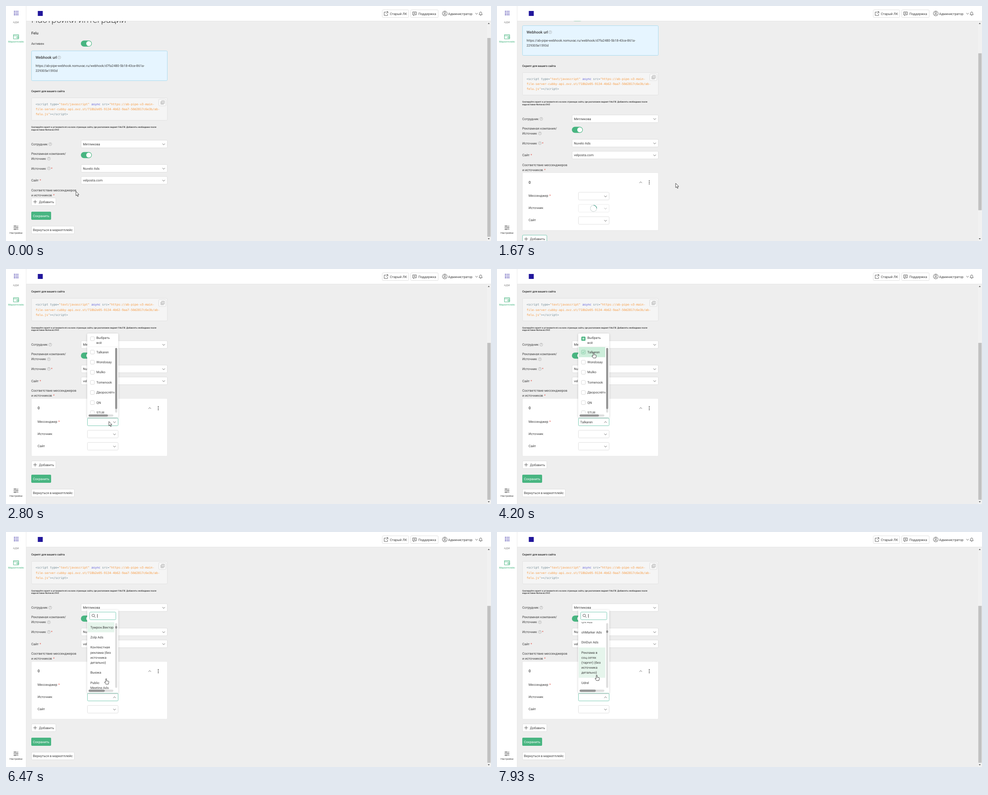
These frames come from a looping animation (1075x521 px, 8 s). An HTML page:

```html
<!DOCTYPE html>
<html lang="ru">
<head>
<meta charset="utf-8">
<title>Настройки интеграции</title>
<style>
html, body { margin: 0; width: 100%; height: 100%; overflow: hidden; background: #eee; }
svg { display: block; width: 1075px; height: 521px; font-family: Roboto, sans-serif; text-rendering: geometricPrecision; }
text { white-space: pre; }
.code { font-family: "DejaVu Sans Mono", monospace; }
.popup { filter: drop-shadow(0 1px 2px #0003); }
</style>
</head>
<body>
<svg id="stage" viewBox="0 0 1075 521"></svg>
<script>
const LOOP = 8000, GROW = 138.5, ROW = 22.4, LINE = 11.2;
const INK = '#3e3e3e', GREEN = '#48b581', TEAL = '#5cbfa2', EDGE = '#d9d9d9', NAVY = '#21169c';

// Drawing helpers; text y is the middle of the capitals
const rect = (x, y, w, h, fill, stroke = 'none', r = 2, more = '') =>
  `<rect x="${x}" y="${y}" width="${w}" height="${h}" rx="${r}" fill="${fill}" stroke="${stroke}" stroke-width=".8" ${more}/>`;
const text = (x, y, s, size = 7.28, fill = INK, more = '') =>
  `<text x="${x}" y="${y + size * .355}" font-size="${size}" fill="${fill}" ${more}>${s}</text>`;
const path = (d, stroke = INK, w = .8, more = '') =>
  `<path d="${d}" fill="none" stroke="${stroke}" stroke-width="${w}" ${more}/>`;
const circle = (x, y, r, fill, stroke = 'none', w = .8) =>
  `<circle cx="${x}" cy="${y}" r="${r}" fill="${fill}" stroke="${stroke}" stroke-width="${w}"/>`;
const group = (id, body, more = '') => `<g id="${id}" ${more}>${body}</g>`;
const bold = 'font-weight="500"', mid = 'text-anchor="middle"';

const chevron = (x, y, id = '', flip = 1) =>
  path('M-2.8-1.4 0 1.4 2.8-1.4', '#555', .9, `id="${id}" transform="translate(${x} ${y}) scale(1 ${flip})"`);
const help = (x, y) => circle(x, y, 3.3, 'none', '#999', .6) + text(x, y, '?', 5, '#888', mid);
const star = (x, y) => text(x, y, '*', 7.28, '#e0483e');
const toggle = y => rect(166, y - 6.8, 24.2, 13.6, GREEN, 'none', 6.8) + circle(183.5, y, 5.6, '#fff');
const select = (y, s) => rect(166.5, y - 8.5, 191, 17, '#fff', EDGE) + text(170.5, y, s) + chevron(349.5, y + .5);
const field = (y, n, s) => text(70, y - 1, s) +
  rect(180.5, y - 8.5, 68, 17, '#fff', EDGE, 2, `id="field${n}"`) + chevron(240.5, y + .5, 'chev' + n);
const box = y => rect(187.2, y - 4.3, 8.6, 8.6, '#fff', '#cfcfcf', 1.5);
const bars = (top, bottom, right) =>
  rect(183, bottom, 55, 4.8, '#dedede', 'none', 2.4) + rect(183, bottom, right - 183, 4.8, '#949494', 'none', 2.4) +
  rect(242, top, 4.4, bottom - top - 4, '#dedede', 'none', 2.2);
const clip = (id, x, y, w, h) => `<clipPath id="${id}">${rect(x, y, w, h, '#000', 'none', 0)}</clipPath>`;

const tint = (c, s) => `<tspan fill="${c}">${s}</tspan>`;
const ORANGE = '#f7993f';
const code = (y, s) => text(65.5, y, s, 6.64, '#738b95', 'class="code"');

const form =
  text(56, 29.8, 'Настройки интеграции', 20, INK, 'font-weight="300"') +
  text(56, 60, 'Felu', 8.4, INK, bold) +
  text(56, 83, 'Активен') + toggle(83.3) +
  rect(56.5, 99.5, 301, 66, '#e6f5ff', '#9dd6ec') +
  text(65.5, 114, 'Webhook url', 8.5, INK, bold) + help(118, 114) +
  text(65.5, 132, 'https://ab-pipe-webhook.nomuvac.ru/webhook/d7fa2480-5b18-43ce-861a-') +
  text(65.5, 143.5, '229305e1593d') +
  text(56, 188.5, 'Скрипт для вашего сайта', 6.16, '#222', bold) +
  rect(56.5, 203.5, 301, 50, '#f5f5f5', '#dedede') +
  code(217.5, `&lt;script type=${tint(ORANGE, '"text/javascript"')} ${tint('#5a5ad8', 'async')} src=${tint(ORANGE, '"https://ab-pipe-v3-main-')}`) +
  code(228.7, tint(ORANGE, 'file-server-cubby-api.ovz.st/718b2e05-9134-4b62-9aa7-50d2817c6e3b/ab-')) +
  code(239.8, tint(ORANGE, 'felu.js"') + '&gt;&lt;/script&gt;') +
  rect(338.5, 206.5, 16, 15, '#f8f8f8', '#dadada') +
  path('M345 210h6v6h-6zM343.300 211.500v6.200h6.200M346.500 212h3M346.500 214h3', '#888', .65) +
  text(56, 268.5, 'Скопируйте скрипт и установите его на всех страницах сайта, где расположен виджет FeluTill. Добавлять необходимо после', 4.7, '#222', bold) +
  text(56, 274.2, 'кода вставки Nomuvac/OVZ', 4.7, '#222', bold) +
  text(56, 306, 'Сотрудник') + help(98, 306.2) + select(306, 'Мятликова') +
  text(56, 327, 'Рекламная компания/') + text(56, 338.2, 'Источник') + help(95, 338.5) + toggle(330.5) +
  text(56, 360, 'Источник') + help(95, 360) + star(99.8, 360) + select(360, 'Nuvelo Ads') +
  text(56, 386.5, 'Сайт') + star(74.5, 386.5) + select(386.5, 'velposta.com') +
  text(56, 408, 'Соответствие мессенджеров') + text(56, 419.2, 'и источников') + star(104.5, 419.2);

const card =
  rect(56.3, 425.5, 301.4, 128, '#fff', '#e6e6e6') +
  text(70, 447, '0', 8.4, INK, bold) + chevron(318.5, 447, '', -1) +
  [-3.5, 0, 3.5].map(d => circle(337.5, 447 + d, 1, '#333')).join('') +
  field(477.5, 1, 'Мессенджер') + star(116, 476.5) + text(184.5, 477.5, 'Talkaren', 7.28, INK, 'id="chosen"') +
  field(504.5, 2, 'Источник') + field(531.5, 3, 'Сайт') +
  group('spinner', circle(0, 0, 7, 'none', '#cfd8d6', 1) + path('M0-7A7 7 0 0 1 7 0', '#3f9d87', 1.1));

const foot =
  rect(56.5, 425.5, 54, 17, '#fff', EDGE, 2, 'id="add"') +
  path('M60.500 434h8M64.500 430v8') + text(73, 434, 'Добавить') +
  rect(56, 456, 44, 18, GREEN) + text(59.8, 465.2, 'Сохранить', 7.28, '#fff') +
  rect(56.5, 488, 95, 17, '#fff', EDGE) + text(59.8, 496.5, 'Вернуться в маркетплейс');

const dots = [...Array(9).keys()].map(i => circle(18.7 + i % 3 * 3.8, 11.8 + (i / 3 | 0) * 3.8, 1.05, NAVY)).join('');
const chrome =
  rect(0, 0, 1075, 33, '#fff', 'none', 0) + rect(0, 0, 44.5, 521, '#fff', 'none', 0) +
  path('M44.700 0V521M45 33.300H1075', '#e2e2e2', .7) +
  dots + text(22, 36, 'АДМ', 5.7, '#888', mid) +
  path('M16.500 63.500h11.500v9.500h-11.500zM16.500 66h11.500M24 68.500h4v2.500h-4z', GREEN, .9) +
  text(22.3, 79.5, 'Маркетплейс', 5.6, GREEN, mid) +
  path('M16.500 488h11M16.500 491.500h11M16.500 495h11') +
  circle(20, 488, 1.2, '#fff', INK) + circle(24.5, 491.5, 1.2, '#fff', INK) + circle(20, 495, 1.2, '#fff', INK) +
  text(22.3, 503.5, 'Настройки', 5.6, INK, mid) +
  rect(70.5, 11, 11, 11, NAVY, 'none', 0) +
  rect(834, 8.5, 58.5, 17, '#fff', EDGE) + rect(897, 8.5, 61, 17, '#fff', EDGE) +
  path('M842 13.500h-3.700v7.500h7.500v-3.700M843 12.500h3.500v3.500M846.300 12.700l-4.300 4.300') + text(851, 17, 'Старый ЛК') +
  path('M901.500 13h8v6.500h-4l-2 2v-2h-2zM903.500 15.200h4M903.500 17.300h4') + text(914, 17, 'Поддержка') +
  circle(972.5, 16.5, 5.3, 'none', INK) + circle(972.5, 15, 2, 'none', INK) +
  path('M969 20.300q3.500-4 7 0') + text(980, 17, 'Администратор') + chevron(1043, 17) +
  path('M1048.500 19.200q1.300-1 1.300-3.700a2.300 2.300 0 0 1 4.600 0q0 2.700 1.300 3.700zM1051 20.700h2.200');

const scrollbar =
  rect(1066, 34, 9, 487, '#f1f1f1', 'none', 0) + rect(1066.8, 71, 7.4, 440, '#c1c1c1', 'none', 0, 'id="thumb"') +
  '<path d="M1067.800 39.800h4.400l-2.200-2.600zM1067.800 515h4.400l-2.200 2.600z" fill="#555"/>';

const messengers = ['Talkaren', 'Wondosay', 'Mulko', 'Tomenook', 'Дворослётники', 'QN', '5TUR'];
const popup1 =
  rect(180, 143, 68.8, 186, '#fff', 'none', 2, 'class="popup"') +
  text(200.3, 152.3, 'Выбрать') + text(200.3, 163.3, 'всё') + box(154.5) + path('M181 172.300h67', '#eee') +
  group('some', rect(187, 150, 9, 9, GREEN, 'none', 1.5) + path('M189.300 153h4.400M189.300 154.500h4.400M189.300 156h4.400', '#e8f7ef', 1)) +
  group('', rect(181, 173, 59, ROW, '#e6f5ec', 'none', 0, 'id="hover1"') +
    rect(181, 173, 59, ROW, '#cdeedb', 'none', 0, 'id="picked"') +
    messengers.map((s, i) => box(184.2 + i * ROW) + text(200.3, 184 + i * ROW, s)).join('') +
    group('tick', rect(187.2, 179.9, 8.6, 8.6, '#c2ead3', '#86cfa8', 1.5) + path('M189.300 184.300l1.600 1.600 3-3.200', GREEN)),
    'clip-path="url(#clip1)"') +
  bars(175, 322.5, 226) + rect(242, 175, 4.4, 135.5, '#949494', 'none', 2.2);

// Each row is as tall as its lines plus one line of padding
let y = 200;
const ads = ['1', 'Nuvelo Ads', 'Тумрон.Бизнес|Карты', 'Тумрон.Бизнес|Поиск', 'Тумрон.Вектор', 'Zolp Ads',
  'Контекстная|реклама (без|источника|детально)', 'Вьюжа', 'Public|Meeting Ads', 'QN Ads', 'ohMarker Ads', 'DinDun Ads',
  'Реклама в|соц.сетях|(таргет) (без|источника|детально)', 'Udrel'].map(s => {
  const lines = s.split('|'), row = { lines, y, h: LINE * (lines.length + 1) };
  y += row.h;
  return row;
});
const popup2 =
  rect(180, 172.5, 68.8, 184.5, '#fff', 'none', 2, 'class="popup"') +
  rect(185.5, 177.5, 58, 17, '#fff', TEAL) +
  circle(193.3, 185, 2.9, 'none', INK) + path('M195.500 187.200l2.800 2.800') +
  path('M202.500 182v8', '#222', .8, 'id="caret"') +
  group('', group('list', rect(181, 0, 59, ROW, '#e6f5ec', 'none', 0, 'id="hover2"') +
    ads.map(r => r.lines.map((s, i) => text(187, r.y + LINE * (i + 1) - .2, s)).join('')).join('')),
    'clip-path="url(#clip2)"') +
  bars(202, 349.6, 219) + rect(242, 202, 4.4, 5.8, '#949494', 'none', 2.2, 'id="knob"');

const pointers =
  '<path id="arrow" d="M0 0V9.700L2.200 7.700 3.800 11.300 5.400 10.600 3.800 7.100H6.900Z" fill="#fff" stroke="#222" stroke-width=".8"/>' +
  '<path id="hand" d="M-1 .8Q0-.7 1 .8V5L5 5.700Q6.300 6 6 7.500L5 12.300H-.7L-3.700 8Q-3.800 6.300-1 8Z" fill="#fff" stroke="#222" stroke-width=".8"/>';

const stage = document.getElementById('stage');
stage.innerHTML = clip('clip1', 181, 173, 59.5, 147.5) + clip('clip2', 181, 199.5, 60, 148.5) +
  rect(0, 0, 1075, 521, '#eee', 'none', 0) +
  group('page', form + group('card', card) + group('foot', foot)) +
  scrollbar + chrome + group('popup1', popup1) + group('popup2', popup2) + group('cursor', pointers);

const $ = id => document.getElementById(id);
const set = (id, name, value) => $(id).setAttribute(name, value);
const show = (id, on) => set(id, 'visibility', on ? 'inherit' : 'hidden');
const move = (id, x, y, more = '') => set(id, 'transform', `translate(${x} ${y}) ${more}`);
const between = (t, a, b) => t >= a && t < b;
// Latest value whose start time has passed
const step = (t, list) => list.reduce((v, [at, next]) => t >= at ? next : v, list[0][1]);

const trail = [[0, 155, 411], [70, 155, 411], [470, 92, 434], [1070, 92, 434], [1540, 396, 393], [2070, 396, 393],
  [2530, 228, 338], [3200, 228, 338], [3670, 214, 185], [4300, 214, 185], [4870, 416, 342], [4930, 416, 342],
  [5450, 230, 363], [5870, 230, 363], [6070, 222, 325], [7460, 222, 325], [7470, 221.5, 324], [7730, 221.5, 324],
  [7930, 221, 317], [LOOP, 221, 317]];

function pointer(t) {
  const i = trail.findIndex(k => k[0] > t), [t0, x0, y0] = trail[i - 1], [t1, x1, y1] = trail[i];
  const u = (t - t0) / (t1 - t0), e = u * u * (3 - 2 * u);
  return [x0 + (x1 - x0) * e, y0 + (y1 - y0) * e];
}

function draw(now) {
  const t = now % LOOP, [x, y] = pointer(t);
  const grown = t >= 800, picked = t >= 4070;
  const open1 = between(t, 2730, 4930), open2 = t >= 5530;

  const scroll = step(t, [[0, 0], [1670, 56], [1730, 112], [1800, GROW]]);
  const height = 519.5 + (grown ? GROW : 0);
  move('page', 0, -scroll);
  move('foot', 0, grown ? GROW : 0);
  show('card', grown);
  set('thumb', 'y', 42 + (scroll + 32) * 470 / height);
  set('thumb', 'height', 487 * 470 / height);

  const onAdd = !grown && x < 111 && y > 425;
  set('add', 'stroke', onAdd || between(t, 800, 2730) ? TEAL : EDGE);

  const loading = between(t, 800, 1800);
  show('spinner', loading);
  move('spinner', 214, 504.7, `rotate(${(t - 1670) * .36})`);
  const on1 = open1 || between(t, 2070, 2730) && x < 249;
  const on2 = open2 || between(t, 5200, 5530) && x < 249 && y > 357;
  set('field1', 'stroke', on1 ? TEAL : EDGE);
  set('field2', 'stroke', on2 ? TEAL : loading ? '#e8e8e8' : EDGE);
  set('chev2', 'opacity', loading ? .5 : 1);
  const turn = open1 ? Math.min(1, Math.max(0, (t - 2800) / 200)) : 0;
  move('chev1', 240.5, 478, `scale(1 ${1 - 2 * turn})`);
  move('chev2', 240.5, 505, `scale(1 ${open2 ? -1 : 1})`);
  show('chosen', picked);

  show('popup1', open1);
  const inList = open1 && x < 241 && between(y, 173, 320);
  show('hover1', inList);
  set('hover1', 'y', 173 + Math.floor((y - 173) / ROW) * ROW);
  for (const id of ['some', 'picked', 'tick']) show(id, open1 && picked);

  show('popup2', open2);
  const offset = step(t, [[0, 0], [6270, 56], [6400, 112], [6670, 168], [6930, 224], [7000, 280]]);
  const hover = ads[step(t, [[0, -1], [5940, 5], [6000, 4], [6670, -1], [7330, 13], [7800, 12]])];
  move('list', 0, -offset);
  set('knob', 'y', 202 + offset * .057);
  show('hover2', open2 && hover);
  if (hover) {
    set('hover2', 'y', hover.y);
    set('hover2', 'height', hover.h);
  }
  show('caret', open2 && !between(t, 6000, 6470) && !between(t, 7000, 7470));

  const hand = onAdd || inList || open2 && y < 348;
  show('hand', hand);
  show('arrow', !hand);
  move('cursor', x, y);
  requestAnimationFrame(draw);
}
requestAnimationFrame(draw);
</script>
</body>
</html>
```
